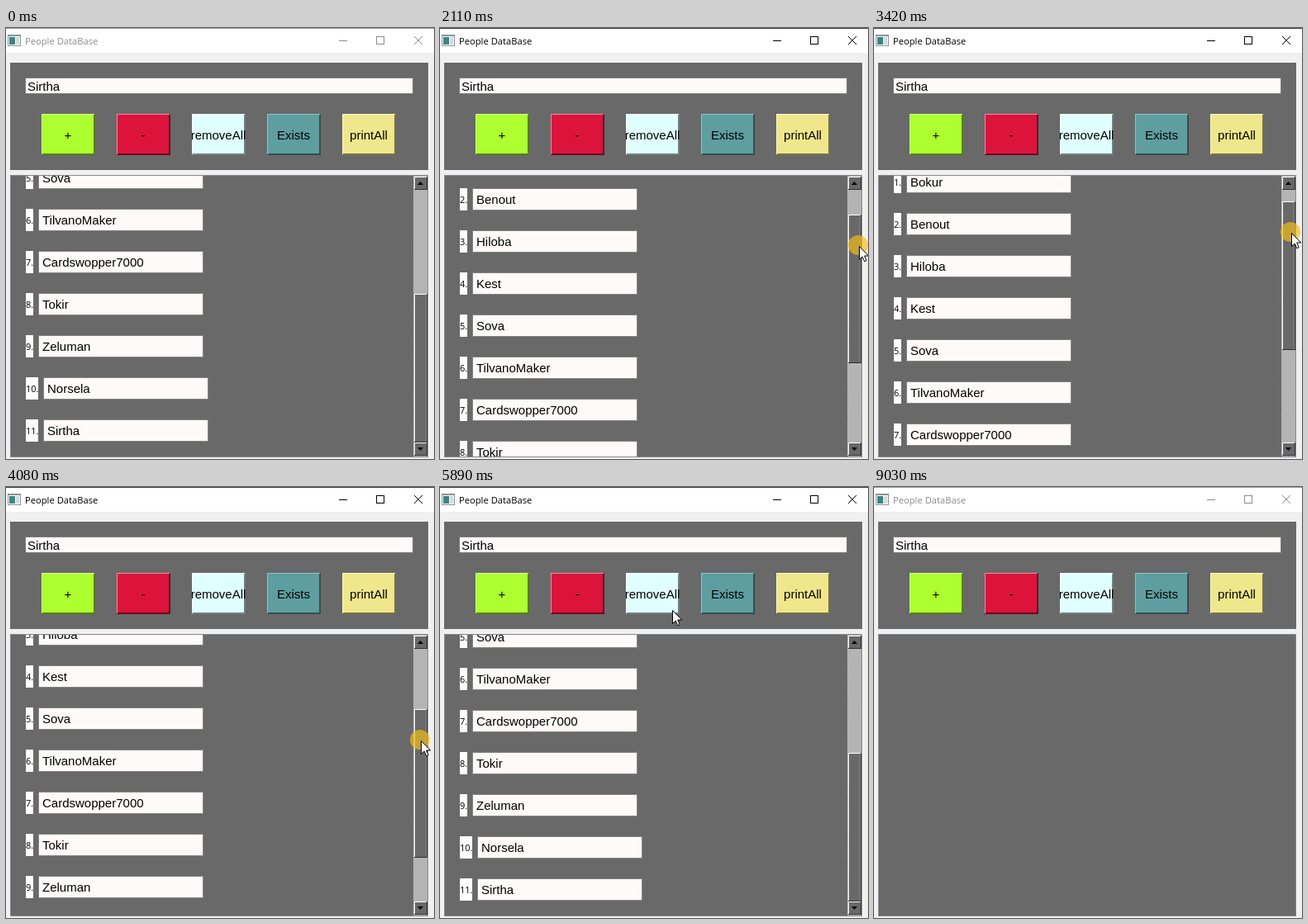
Animation of 518 by 522 pixels, one loop 9080 ms. Source, as an HTML page with a canvas:

```html
<!DOCTYPE html>
<html lang="en">
<head>
<meta charset="utf-8">
<title>People DataBase</title>
<style>
html, body { margin: 0; width: 518px; height: 522px; overflow: hidden; background: #f0f0f0; }
canvas { display: block; }
</style>
</head>
<body>
<canvas id="stage" width="518" height="522"></canvas>
<script>
const ctx = document.getElementById('stage').getContext('2d');
const LOOP = 9080;
const ARIAL = '15px "Liberation Sans", Arial, sans-serif';
const UI = '"Open Sans", "Noto Sans", sans-serif';
const GRAY = '#696969', SNOW = '#fffafa';

const people = ['Bokur', 'Benout', 'Hiloba', 'Kest', 'Sova', 'TilvanoMaker',
  'Cardswopper7000', 'Tokir', 'Zeluman', 'Norsela', 'Sirtha'];

// label, face, light edge, dark edge
const buttons = [
  ['+', '#adff2f', '#d6ff97', '#567f17'],
  ['-', '#dc143c', '#ee899d', '#6e0a1e'],
  ['removeAll', '#e0ffff', '#ffffff', '#707f7f'],
  ['Exists', '#5f9ea0', '#8fc4c5', '#2f4f50'],
  ['printAll', '#f0e68c', '#fffac5', '#787346']
];

const T = { show: 80, grab: 1010, drop: 5330, press: 6470, clear: 6770, hide: 8660, blur: 9030 };
const THUMB = { top: 196, bottom: 322, size: 180, grip: 38, ratio: 235 / 126 };

// time, x, y of the pointer tip
const path = [
  [80, 171, 514], [350, 290, 330], [600, 430, 222], [720, 485, 204], [980, 503, 360],
  [1010, 503, 360], [1470, 502, 340], [2110, 507, 264], [2450, 505, 233], [2800, 504, 226],
  [3150, 505, 232], [3420, 505, 248], [4080, 502, 307], [4670, 502, 353], [5180, 505, 384],
  [5330, 505, 384], [5600, 395, 260], [5890, 281, 149], [6230, 256, 131], [7770, 256, 131],
  [8000, 290, 104], [8300, 400, 240], [8660, 494, 522]
];

const clamp = (v, a, b) => Math.min(b, Math.max(a, v));

const slope = (i, k) => (path[i + 1][k] - path[i][k]) / (path[i + 1][0] - path[i][0]);

// Harmonic mean keeps each segment free of overshoot.
function tangent(i, k) {
  if (i === 0 || i === path.length - 1) return 0;
  const a = slope(i - 1, k), b = slope(i, k);
  return a * b > 0 ? 2 * a * b / (a + b) : 0;
}

function along(t, k) {
  t = clamp(t, path[0][0], path[path.length - 1][0]);
  let i = 0;
  while (i < path.length - 2 && t > path[i + 1][0]) i++;
  const h = path[i + 1][0] - path[i][0], s = (t - path[i][0]) / h, r = 1 - s;
  return path[i][k] * (1 + 2 * s) * r * r + tangent(i, k) * h * s * r * r +
    path[i + 1][k] * s * s * (3 - 2 * s) - tangent(i + 1, k) * h * s * s * r;
}

function rect(x, y, w, h, color) {
  ctx.fillStyle = color;
  ctx.fillRect(x, y, w, h);
}

function text(str, x, y, font, color = '#000', align = 'left') {
  ctx.font = font;
  ctx.fillStyle = color;
  ctx.textAlign = align;
  ctx.fillText(str, x, y);
}

function clipped(x, y, w, h, draw) {
  ctx.save();
  ctx.beginPath();
  ctx.rect(x, y, w, h);
  ctx.clip();
  draw();
  ctx.restore();
}

function bevel(x, y, w, h, face, light, dark) {
  rect(x, y, w, h, dark);
  rect(x, y, w - 1, h - 1, light);
  rect(x + 1, y + 1, w - 2, h - 2, face);
}

function poly(points, color) {
  ctx.beginPath();
  points.forEach(([x, y]) => ctx.lineTo(x, y));
  ctx.closePath();
  ctx.fillStyle = color;
  ctx.fill();
}

function makeDither() {
  const c = document.createElement('canvas');
  c.width = c.height = 2;
  const g = c.getContext('2d');
  g.fillStyle = GRAY;
  g.fillRect(0, 0, 2, 2);
  g.fillStyle = '#fff';
  g.fillRect(0, 0, 1, 1);
  g.fillRect(1, 1, 1, 1);
  return ctx.createPattern(c, 'repeat');
}
const dither = makeDither();

function titleBar(active) {
  const ink = active ? '#000' : '#8c8c8c';
  rect(0, 0, 518, 30, '#fff');
  rect(0, 0, 518, 1, active ? '#3c3c3c' : '#9a9a9a');
  rect(2, 8, 16, 14, '#8a9499');
  rect(3, 10, 14, 11, '#f4f8f8');
  rect(4, 11, 7, 9, '#3d8583');
  rect(12, 11, 4, 9, '#cfdcdd');
  text('People DataBase', 23, 20, '11.2px ' + UI, ink);
  rect(403, 15, 10, 1, ink);
  ctx.strokeStyle = ink;
  ctx.lineWidth = 1;
  ctx.strokeRect(448.5, 10.5, 9, 9);
  ctx.beginPath();
  ctx.moveTo(494, 10);
  ctx.lineTo(504, 20);
  ctx.moveTo(504, 10);
  ctx.lineTo(494, 20);
  ctx.stroke();
}

function button([label, face, light, dark], i, pressed) {
  const x = 43 + 91 * i, y = 104, d = pressed ? 1 : 0;
  if (pressed) [light, dark] = [dark, light];
  bevel(x, y, 65, 50, face, light, dark);
  if (!pressed) {
    rect(x + 1, y + 48, 63, 1, dark);
    rect(x + 63, y + 1, 1, 48, dark);
  }
  clipped(x, y, 65, 50, () => text(label, x + 32 + d, 135 + d, ARIAL, '#000', 'center'));
}

function topPanel(t) {
  rect(5, 42, 506, 130, GRAY);
  rect(23, 60, 470, 20, '#7d7d7d');
  rect(24, 61, 468, 18, SNOW);
  text('Sirtha', 26, 76, ARIAL);
  buttons.forEach((b, i) => button(b, i, i === 2 && t >= T.press && t < T.clear));
}

function row(name, i, scroll) {
  const y = 199 + 51 * i - scroll;
  if (y > 520 || y < 150) return;
  const w = i < 9 ? 9 : 15;
  rect(24, y, w, 27, '#fff');
  text(i + 1 + '.', 24, y + 18, '11px ' + UI);
  rect(24 + w + 6, y, 200, 27, '#858585');
  rect(24 + w + 7, y + 1, 198, 25, SNOW);
  text(name, 24 + w + 11, y + 19, ARIAL);
}

function arrowButton(y, dir) {
  bevel(494, y, 16, 16, GRAY, '#fff', '#303030');
  const m = y + 8;
  poly([[498, m + 2 * dir], [505, m + 2 * dir], [501.5, m - 2 * dir]], '#000');
}

function scrollBar(thumb) {
  rect(493, 179, 17, 340, dither);
  arrowButton(180, 1);
  arrowButton(502, -1);
  bevel(494, thumb, 16, THUMB.size, GRAY, '#fff', '#303030');
  rect(508, thumb + 1, 1, THUMB.size - 2, '#8c8c8c');
}

function list(t) {
  rect(5, 178, 506, 342, '#828790');
  rect(6, 179, 504, 340, GRAY);
  if (t >= T.clear) return;
  const dragging = t >= T.grab && t < T.drop;
  const thumb = dragging
    ? Math.round(clamp(along(t, 2) - THUMB.grip, THUMB.top, THUMB.bottom))
    : THUMB.bottom;
  const scroll = Math.round((thumb - THUMB.top) * THUMB.ratio);
  clipped(6, 179, 487, 340, () => people.forEach((p, i) => row(p, i, scroll)));
  scrollBar(thumb);
}

function pointer(t) {
  if (t < T.show || t >= T.hide) return;
  const x = Math.round(along(t, 1)), y = Math.round(along(t, 2));
  const down = (t >= T.grab && t < T.drop) || (t >= T.press && t < T.clear);
  if (down) {
    ctx.beginPath();
    ctx.arc(x - 1, y - 1, 12, 0, Math.PI * 2);
    ctx.fillStyle = 'rgba(244, 190, 24, 0.68)';
    ctx.fill();
  }
  ctx.save();
  ctx.translate(x + 0.5, y + 0.5);
  poly([[0, 0], [0, 16], [3.7, 12.5], [6.3, 18.3], [8.7, 17.2], [6.2, 11.5], [11.2, 11.5]], '#fff');
  ctx.strokeStyle = '#000';
  ctx.lineWidth = 1;
  ctx.stroke();
  ctx.restore();
}

function draw(t) {
  rect(0, 0, 518, 522, '#f0f0f0');
  titleBar(t >= T.grab && t < T.blur);
  topPanel(t);
  list(t);
  pointer(t);
}

const start = performance.now();
function tick() {
  draw((performance.now() - start) % LOOP);
  requestAnimationFrame(tick);
}
tick();
</script>
</body>
</html>
```
